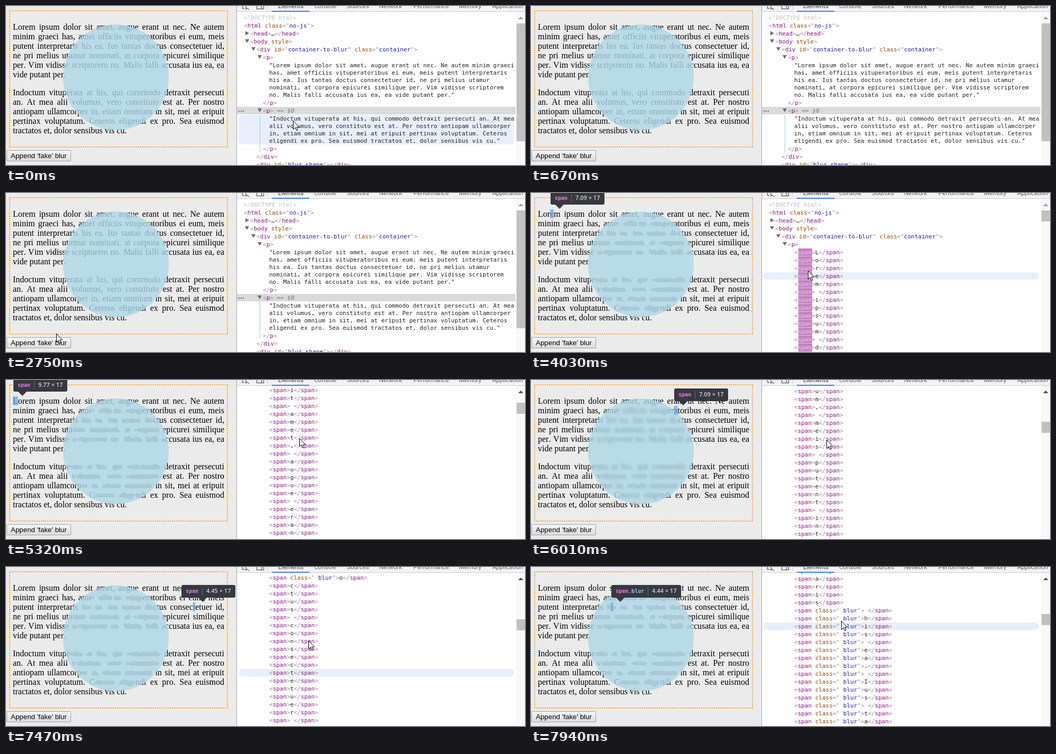
An HTML page that plays this animation: 982x301 px, repeating every 8000 ms.

```html
<!DOCTYPE html>
<html lang="en">
<head>
<meta charset="utf-8">
<title>Fake blur demo</title>
<style>
html, body { margin: 0; width: 100%; height: 100%; overflow: hidden; background: #ebebeb; }
#stage { position: relative; width: 982px; height: 301px; overflow: hidden; }
#frame { position: absolute; left: 6px; top: 8px; width: 414px; height: 260px; box-sizing: border-box; border: 2px dotted #ff9f2e; }
.copy { position: absolute; left: 13px; top: 31px; width: 400px; height: 214px; font: 16px/18px "Liberation Serif", "Times New Roman", serif; font-kerning: none; font-variant-ligatures: none; color: #000; }
.line { position: absolute; left: 0; width: 400px; height: 18px; text-align: justify; text-align-last: justify; }
.line.end { text-align-last: left; }
.smear { visibility: hidden; filter: url(#blob); }
.soft .smear { filter: url(#soft); }
.done .smear .b { visibility: visible; }
.done .plain .b { visibility: hidden; }
#btn { position: absolute; left: 1px; top: 273px; width: 122px; height: 21px; box-sizing: border-box; border: 1px solid #a3a3a3; border-radius: 1px; background: linear-gradient(#f6f6f6, #dcdcdc); font: 13.333px/19px "Liberation Sans", Arial, sans-serif; text-align: center; white-space: nowrap; }
#btn.over { background: linear-gradient(#fafafa, #e4e4e4); border-color: #8f8f8f; }
#btn.down { background: linear-gradient(#d6d6d6, #ececec); border-color: #808080; }
svg { position: absolute; left: 0; top: 0; }
text { white-space: pre; }
.code text { font: 11px "DejaVu Sans Mono", monospace; fill: #222; }
.k { fill: #a08a9e; } .t { fill: #881280; } .a { fill: #994500; } .v { fill: #1a1aa6; }
.d { fill: #c0c0c0; } .q { fill: #808080; font-style: italic; }
.f { fill: var(--ink); } .flash { fill: var(--flash); }
.tabs text { font: 11.6px Roboto, sans-serif; fill: #5a5a5a; }
#name { font: bold 10px "DejaVu Sans Mono", monospace; fill: #ee78e6; }
#name .c { fill: #8fc6f0; }
#size { font: 600 11px "Open Sans", sans-serif; fill: #d4d4d4; }
</style>
</head>
<body>
<div id="stage">
  <div id="frame"></div>
  <div class="copy plain"></div>
  <div class="copy smear"></div>
  <div id="btn">Append 'fake' blur</div>
  <svg width="982" height="301" viewBox="0 0 982 301" xml:space="preserve">
    <defs>
      <filter id="blob" color-interpolation-filters="sRGB">
        <feGaussianBlur stdDeviation="2.3"/>
        <feComponentTransfer><feFuncA type="discrete" tableValues="0 .36 .36 .36 .36"/></feComponentTransfer>
      </filter>
      <filter id="soft" color-interpolation-filters="sRGB">
        <feGaussianBlur stdDeviation="2.1"/>
        <feComponentTransfer><feFuncA type="linear" slope="1.150"/></feComponentTransfer>
      </filter>
      <clipPath id="view"><rect x="437" y="11" width="545" height="290"/></clipPath>
    </defs>
    <circle cx="208" cy="135" r="100" fill="#add8e6" opacity=".8"/>
    <g id="mark">
      <rect id="margin" fill="#f6b26b" opacity=".66"/>
      <rect id="content" fill="#6fa8dc" opacity=".72"/>
    </g>
    <g id="tip">
      <path d="M9 24h16l-8 8z" fill="#373941"/>
      <g id="label">
        <rect id="plate" height="24" rx="3" fill="#373941"/>
        <text id="name" x="8" y="15"></text>
        <path id="bar" stroke="#6c6e75"/>
        <text id="size" y="15"></text>
      </g>
    </g>
    <rect x="436" width="546" height="301" fill="#fff"/>
    <g clip-path="url(#view)">
      <rect id="picked" x="437" y="191" width="527" height="14" fill="#dadada"/>
      <rect id="hover" x="440" width="521" rx="7" fill="#e8effa"/>
      <g id="before" class="code"></g>
      <g id="after" class="code"></g>
    </g>
    <rect x="965" y="11" width="17" height="290" fill="#f9f9f9"/>
    <path id="up" d="M969 25h10l-5-5z"/>
    <rect id="thumb" x="966" width="16" fill="#c1c1c1"/>
    <g class="tabs">
      <rect x="437" width="545" height="10" fill="#f3f3f3"/>
      <path d="M437 10.5h545" stroke="#cdcdcd"/>
      <rect x="503" y="9" width="71" height="2" fill="#3b82ee"/>
      <path d="M447.5 0v4.5h4M454 0v6l2-2 4 3M474.5 0v5.500h13V0M483.500 0v5" fill="none" stroke="#6e6e6e" stroke-width="1.5"/>
      <path d="M494.500 0v7" stroke="#ccc"/>
      <g id="tabs"></g>
    </g>
    <path d="M436.500 0v301" stroke="#a3a3a3"/>
    <path id="cursor" d="M.5.5V16.500L4.200 13 6.700 18.700 9 17.700 6.600 12.200H11.700Z" fill="#fff" stroke="#000"/>
  </svg>
</div>
<script>
const $ = id => document.getElementById(id);
const stage = $('stage');
const LOOP = 8000, ROW = 15, FIRST = 112, CLICK = 3520;

// Brackets enclose the letters lying under the circle.
const lines = [
  'Lorem ipsum dolor sit amet, augue erant ut nec. Ne autem',
  'minim graeci has, ame[t officiis vitup]eratoribus ei eum, meis',
  'putent interpretaris[ his ea. Ius tantas do]ctus consectetuer id,',
  'ne pri melius uta[mur nominati, at corpora ]epicurei similique',
  'per. Vim vidisse[ scriptorem no. Malis falli a]ccusata ius ea, ea',
  'vide putant per.',
  'Indoctum vitupe[rata at his, qui commodo ]detraxit persecuti',
  'an. At mea alii v[olumus, vero constituto ]est at. Per nostro',
  'antiopam ullamcorp[er in, etiam omnium ]in sit, mei at eripuit',
  'pertinax voluptatum. C[eteros elige]ndi ex pro. Sea euismod',
  'tractatos et, dolor sensibus vis cu.'
];
const lineTop = i => i * 18 + (i > 5 ? 16 : 0);
const copy = lines.map((s, i) =>
  `<div class="line${i == 5 || i == 10 ? ' end' : ''}" style="top:${lineTop(i)}px">` +
  s.replace('[', '<span class="b">').replace(']', '</span>') + '</div>').join('');
for (const el of document.querySelectorAll('.copy')) el.innerHTML = copy;

// Every letter of the first paragraph with its place on the page;
// measured widths are rounded up to 1/64 px, so take that step off.
const letters = [];
document.querySelectorAll('.plain .line').forEach((line, i) => {
  if (i > 5) return;
  const y = 31 + lineTop(i);
  for (const node of line.childNodes) {
    const blur = node.nodeType == 1, text = blur ? node.firstChild : node;
    for (let j = 0; j < text.length; j++) {
      const r = document.createRange();
      r.setStart(text, j);
      r.setEnd(text, j + 1);
      const box = r.getBoundingClientRect();
      letters.push({ c: text.data[j], blur, x: box.left, w: box.width - 1 / 64, y });
    }
  }
  letters.push({ c: ' ', blur: false, x: 413, w: 0, y });
});

// Markup helpers for the element tree
const span = (c, s) => `<tspan class="${c}">${s}</tspan>`;
const attr = (n, v) => ' ' + span('a', n) + span('k', '="') + span('v', v) + span('k', '"');
const open = (n, extra = '', cls = 't') => span('k', '&lt;') + span(cls, n) + extra + span('k', '&gt;');
const close = n => span('k', '&lt;/') + span('t', n) + span('k', '&gt;');
const row = (x, y, html) => `<text x="${x}" y="${y + 4}">${html}</text>`;
const down = (x, y) => `<path d="M${x - 10} ${y - 4}h8l-4 7z" fill="#6e6e6e"/>`;

const head =
  row(450, 22, span('d', '&lt;!DOCTYPE html&gt;')) +
  row(450, 37, open('html', attr('class', 'no-js'))) +
  '<path d="M453 47.500v8l7-4z" fill="#6e6e6e"/>' +
  row(462, 52, open('head') + '…' + close('head')) +
  down(462, 67) + row(462, 67, open('body', ' ' + span('a', 'style'))) +
  down(474, 82) + row(474, 82, open('div', attr('id', 'container-to-blur') + attr('class', 'container'))) +
  down(486, 97) + row(486, 97, open('p'));

const block = (y, list) => list.map((s, i) => row(498, y + 14 * i, s)).join('');
$('before').innerHTML = head +
  block(112, [
    '"Lorem ipsum dolor sit amet, augue erant ut nec. Ne autem minim graeci',
    'has, amet officiis vituperatoribus ei eum, meis putent interpretaris',
    'his ea. Ius tantas doctus consectetuer id, ne pri melius utamur',
    'nominati, at corpora epicurei similique per. Vim vidisse scriptorem',
    'no. Malis falli accusata ius ea, ea vide putant per."'
  ]) + row(486, 183, close('p')) +
  '<g fill="#777"><circle cx="441" cy="199" r="1.300"/><circle cx="445" cy="199" r="1.300"/><circle cx="449" cy="199" r="1.300"/></g>' +
  down(486, 198) + row(486, 198, open('p') + ' ' + span('q', '== $0')) +
  '<path d="M480.500 206v71" stroke="#9cc8ea"/>' +
  block(213, [
    '"Indoctum vituperata at his, qui commodo detraxit persecuti an. At mea',
    'alii volumus, vero constituto est at. Per nostro antiopam ullamcorper',
    'in, etiam omnium in sit, mei at eripuit pertinax voluptatum. Ceteros',
    'eligendi ex pro. Sea euismod tractatos et, dolor sensibus vis cu."'
  ]) + row(486, 270, close('p')) + row(474, 285, close('div')) +
  row(474, 300, open('div', attr('id', 'blur-shape')) + close('div'));

$('after').innerHTML = head + letters.map((l, i) => {
  const y = FIRST + ROW * i;
  return `<rect class="flash" x="505.500" y="${y - 7}" width="26.500" height="14.500" rx="1"/>` +
    row(498, y, open('span', l.blur ? attr('class', ' blur') : '', 'f') + l.c + close('span'));
}).join('');

$('tabs').innerHTML = [['Elements', 515], ['Console', 583], ['Sources', 645], ['Network', 706],
  ['Performance', 771], ['Memory', 857], ['Application', 920]]
  .map(([s, x], i) => `<text x="${x}" y="4"${i ? '' : ' style="fill:#333"'}>${s}</text>`).join('');

// Motion: time, x, y; short rests keep the picture still between steps.
const path = [[0, 543, 217], [50, 543, 217], [260, 538, 222], [440, 538, 222], [670, 548, 325],
  [1949, 868, 325], [1950, 868, 296], [1990, 868, 296], [2400, 450, 296], [2750, 95, 266],
  [2980, 62, 281], [3540, 62, 281], [4020, 524, 147], [4100, 524, 147], [4330, 528, 143],
  [4700, 555, 110], [5380, 555, 110], [5840, 559, 113], [6310, 559, 113], [7040, 559, 171],
  [7120, 559, 171], [7880, 587, 102]];
const scroll = [[5180, 0], [5310, 378], [5380, 378], [5660, 940], [5840, 940], [6000, 1726],
  [6070, 1726], [6130, 1840], [6310, 1840], [7040, 2800], [7120, 2800], [7880, 2100]];
// What is pointed at from each time on; numbers are letters.
const hovers = [[0, 'text'], [550, 'p'], [600, 'shape'], [660, null], [2000, 'shape'], [2400, null],
  [3950, 5], [3985, 4], [4020, 3], [4400, 2], [4500, 1], [4600, 0], [5400, 38], [5640, 63],
  [5940, 96], [6120, 123], [6600, 150], [6800, 168], [7020, 191], [7400, 171], [7700, 151],
  [7860, 143], [7920, 140]];

function at(keys, t, n = 1) {
  const i = keys.findIndex(k => k[0] > t);
  if (i < 0) return keys[keys.length - 1][n];
  if (!i) return keys[0][n];
  const a = keys[i - 1], b = keys[i];
  return a[n] + (b[n] - a[n]) * (t - a[0]) / (b[0] - a[0]);
}
const clamp = v => Math.min(1, Math.max(0, v));
const mix = (a, b, p, alpha = 1) => `rgba(${a.map((v, i) => Math.round(v + (b[i] - v) * p))},${alpha})`;
const set = (el, o) => { for (const k in o) el.setAttribute(k, o[k]); };
const show = (el, on) => { el.style.display = on ? '' : 'none'; };

function target(h, s) {
  if (h === 'text') return { top: 206, h: 56 };
  if (h === 'p') return { top: 263, h: 14, x: 13, y: 155, w: 400, tall: 90, pad: 16, name: 'p' };
  if (h === 'shape') return { top: 293, h: 14, x: 108, y: 35, w: 200, tall: 200, name: 'div' + span('c', '#blur-shape') };
  const l = letters[h];
  return { top: FIRST + ROW * h - s - 7, h: 14, x: l.x, y: l.y, w: l.w, tall: 17,
    name: 'span' + (l.blur ? span('c', '.blur') : '') };
}

function drawHover(h, s) {
  const on = h !== null, o = on ? target(h, s) : {}, boxed = 'x' in o;
  show($('hover'), on);
  show($('mark'), boxed);
  show($('tip'), boxed);
  if (on) set($('hover'), { y: o.top, height: o.h });
  if (!boxed) return;
  const pad = o.pad || 0, left = Math.round(o.x) + 1;
  set($('content'), { x: o.x, y: o.y, width: o.w, height: o.tall });
  show($('margin'), pad);
  set($('margin'), { x: o.x, y: o.y - pad, width: o.w, height: o.tall + 2 * pad });
  $('name').innerHTML = o.name;
  $('size').textContent = `${+o.w.toFixed(2)} × ${o.tall}`;
  const bar = Math.round(15 + $('name').getComputedTextLength());
  const width = Math.round(bar + 17 + $('size').getComputedTextLength());
  set($('bar'), { d: `M${bar + .5} 5v14` });
  set($('size'), { x: bar + 8 });
  set($('plate'), { width });
  set($('label'), { transform: `translate(${Math.min(0, 434 - left - width)} 0)` });
  set($('tip'), { transform: `translate(${left} ${o.y - pad - 33})` });
}

function draw(t) {
  const done = t >= CLICK, s = Math.round(at(scroll, t));
  const x = Math.round(at(path, t)), y = Math.round(at(path, t, 2));
  stage.classList.toggle('done', done);
  stage.classList.toggle('soft', t >= 5840 && t < 7120);
  show($('before'), !done);
  show($('picked'), !done);
  show($('after'), done);
  set($('after'), { transform: `translate(0 ${-s})` });
  set($('thumb'), { y: Math.round(33 + s * .02665), height: done ? 21 : 223 });
  set($('up'), { fill: s ? '#505050' : '#a3a3a3' });

  const p = clamp((t - CLICK) / 1120), fade = clamp(1 - (t - CLICK - 1120) / 280);
  stage.style.setProperty('--flash', mix([158, 54, 153], [245, 219, 244], p, fade));
  stage.style.setProperty('--ink', mix([255, 255, 255], [136, 18, 128], p * p));

  const over = x < 123 && y >= 273 && y < 294;
  $('btn').className = t >= 3280 && t < CLICK ? 'down' : over ? 'over' : '';
  drawHover(hovers.filter(k => k[0] <= t).pop()[1], s);
  set($('cursor'), { transform: `translate(${x} ${y})` });
}

const start = performance.now();
function tick() {
  draw((performance.now() - start) % LOOP);
  requestAnimationFrame(tick);
}
tick();
</script>
</body>
</html>
```
